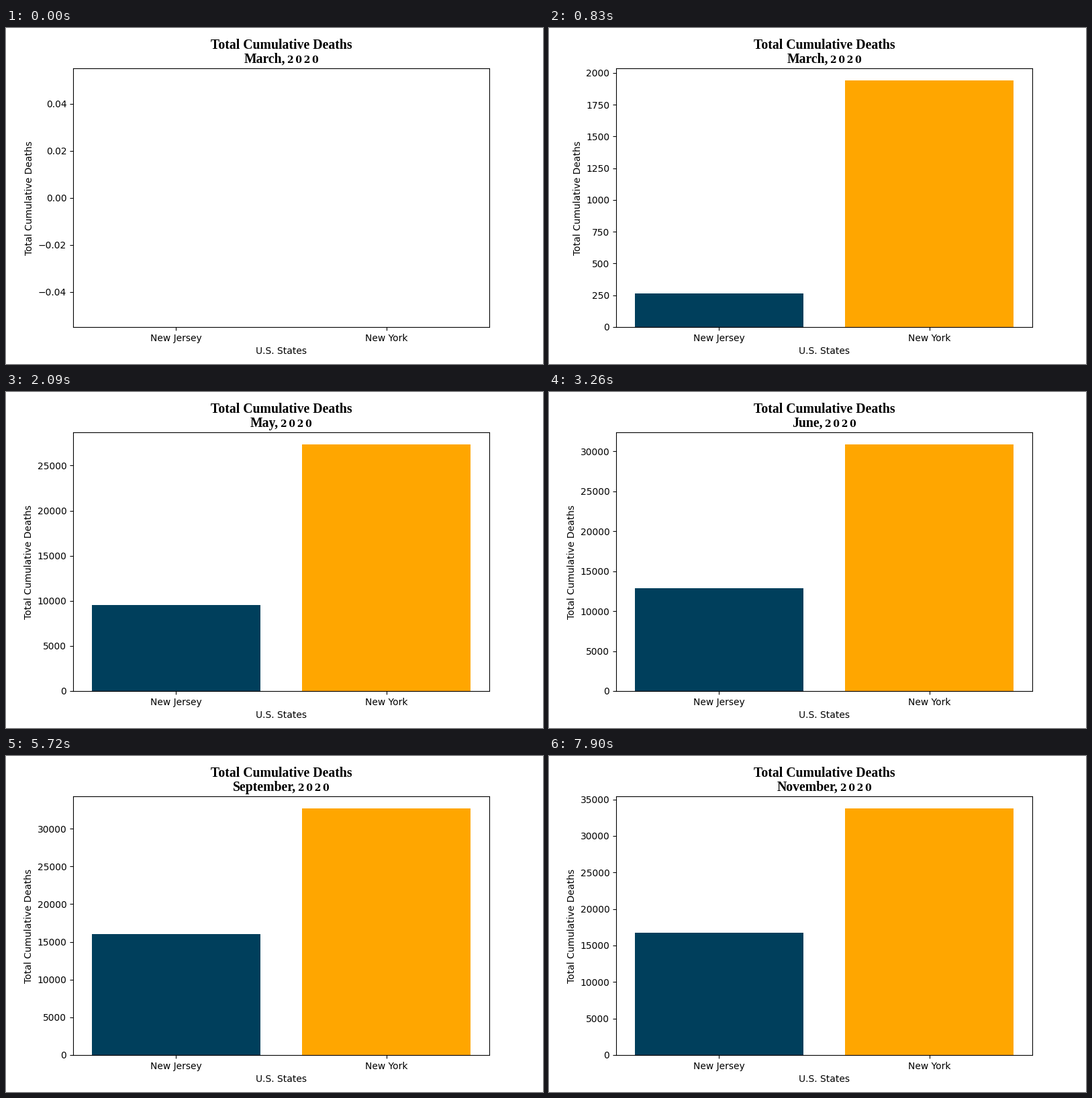
Recreate the animation shown at these times as a matplotlib script. Size 800 by 500 pixels, loop 7.99 s.

```python
import numpy as np
import matplotlib.pyplot as plt
import matplotlib.dates as mdates
from matplotlib.animation import FuncAnimation

W, H = 800, 500
INTERVAL, FRAMES = 34, 235
START = mdates.date2num(np.datetime64("2020-03-01"))
CENTER, GAP = 410, 3

# Turning points of the two curves: day (1 March = 1), New Jersey, New York
KEYS = np.array([
    (7, 0, 0), (10, 1, 0), (16, 3, 10), (31, 267, 1940), (40, 1700, 8000),
    (49, 4070, 17140), (61, 7228, 23780), (73, 9508, 27315),
    (112, 12855, 30855), (118, 14915, 31100), (124, 15100, 31900),
    (193, 16024, 32641), (247, 16360, 33160), (265, 16741, 33728)])

# Every slot advances three days; held slots repeat the picture and last longer
SLOTS = 88
HELD = {1, 3, 57, 58, 62, 68, 69}
ends = np.cumsum([100 if s in HELD else 90 for s in range(SLOTS)])


def day_at(ms):
    slot = min(int(np.searchsorted(ends, ms, side="right")), SLOTS - 1)
    while slot in HELD:
        slot -= 1
    return 4 + 3 * slot


def deaths(day, column):
    """Power-law growth between the turning points."""
    logs = np.interp(np.log(day), np.log(KEYS[:, 0]), np.log1p(KEYS[:, column]))
    return np.expm1(logs)


def label(y, text, font, size, ha):
    return fig.text(CENTER / W, 1 - y / H, text, family=font, size=size,
                    weight="bold", ha=ha, va="baseline")


fig, ax = plt.subplots(figsize=(W / 100, H / 100), dpi=100)
bars = ax.bar(["New Jersey", "New York"], [0, 0], color=["#003f5c", "#ffa600"])
ax.set_xlim(-0.49, 1.49)
ax.set_xlabel("U.S. States")
ax.set_ylabel("Total Cumulative Deaths")

label(31, "Total Cumulative Deaths", "Liberation Serif", 14.2, "center")
month = label(52, "", "Liberation Serif", 14.2, "left")
# Small, loosely set digits stand in for old-style figures
year = label(52, "\u2009".join("2020"), "DejaVu Serif", 10, "right")


def update(i):
    day = day_at((i + 1) * INTERVAL)
    values = [deaths(day, column) for column in (1, 2)]
    for bar, value in zip(bars, values):
        bar.set_height(value)
    top = max(values)
    ax.set_ylim((0, 1.05 * top) if top else (-0.05 * 1.1, 0.05 * 1.1))

    month.set_text(mdates.num2date(START + day - 1).strftime("%B,"))
    half = (month.get_window_extent().width + GAP
            + year.get_window_extent().width) / 2
    month.set_x((CENTER - half) / W)
    year.set_x((CENTER + half) / W)
    return [*bars, month, year]


anim = FuncAnimation(fig, update, frames=FRAMES, interval=INTERVAL,
                     repeat=True, repeat_delay=0, blit=False)
plt.show()
```
